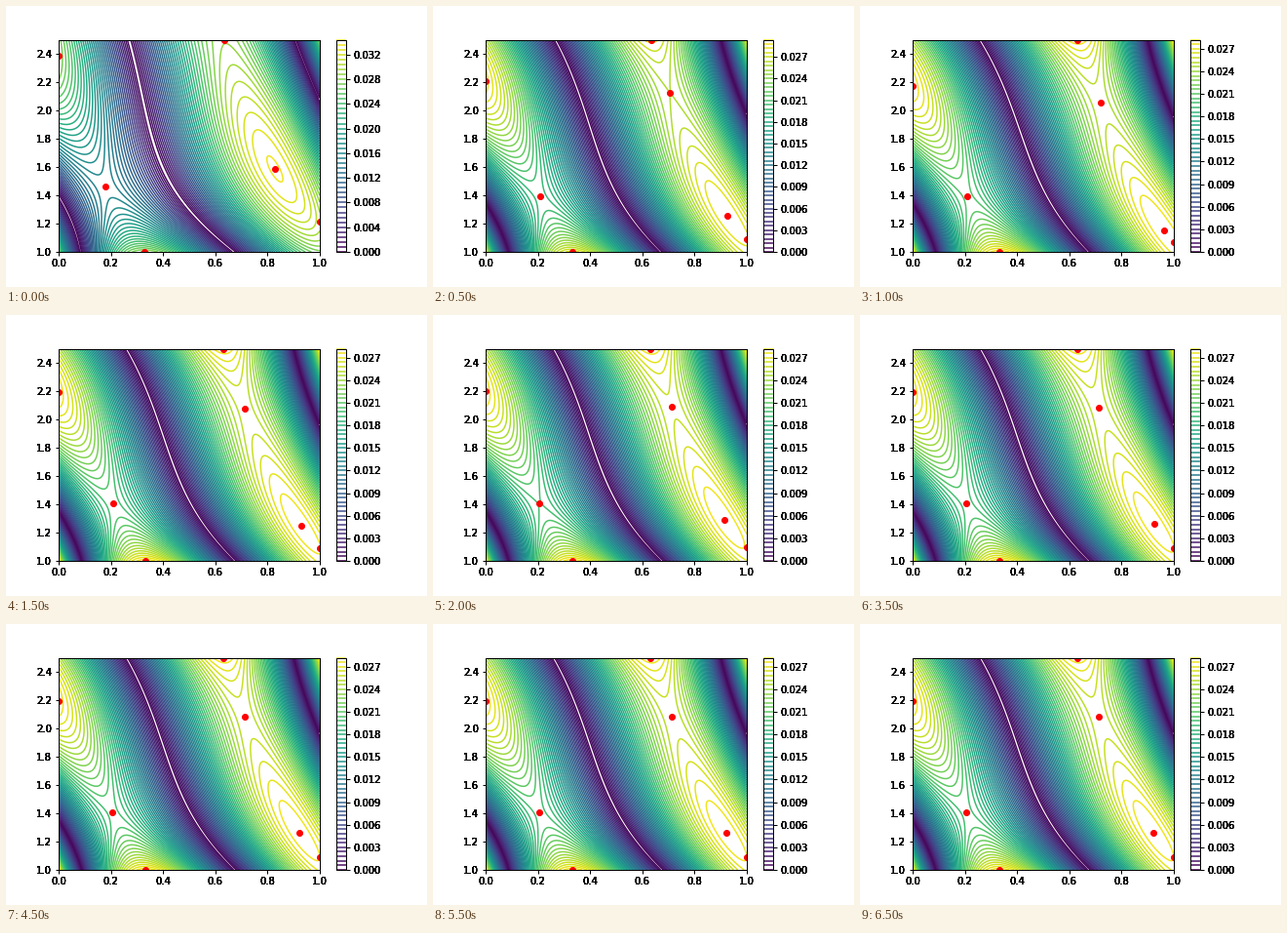
A matplotlib script for the animation above (7000 ms loop, 432 by 288 pixels).

```python
import numpy as np
import matplotlib.pyplot as plt
from matplotlib.animation import FuncAnimation
from matplotlib.text import Text

# Chebyshev approximation of log(x + y) sin(x) by quadratics on [0,1] x [1,2.5]:
# each step adds the critical points of the error and solves again.
FRAMES, INTERVAL = 14, 500
START = np.array([-0.1334, 0.0641, 0.1352, 0.205, 0.3137, -0.0283])
CORNERS = np.array([[0, 1], [1, 2.5], [0, 2.5], [1, 1]], float)

plt.rcParams.update({
    "font.family": "DejaVu Sans", "font.size": 10,
    "figure.subplot.left": 0.125, "figure.subplot.right": 0.9,
    "figure.subplot.bottom": 0.125, "figure.subplot.top": 0.88,
    "axes.linewidth": 1, "xtick.major.width": 1, "ytick.major.width": 1,
})


def func(x, y):
    return np.log(x + y) * np.sin(x)


def basis(x, y):
    return np.stack([np.ones_like(x), x, y, x * x, x * y, y * y], axis=-1)


def gradient(c, x, y):
    s = x + y
    gx = c[1] + 2 * c[3] * x + c[4] * y - np.sin(x) / s - np.cos(x) * np.log(s)
    gy = c[2] + c[4] * x + 2 * c[5] * y - np.sin(x) / s
    return gx, gy


def hessian(c, x, y):
    s = x + y
    curve = np.sin(x) / s**2
    hxx = 2 * c[3] - 2 * np.cos(x) / s + curve + func(x, y)
    hxy = c[4] - np.cos(x) / s + curve
    return hxx, hxy, 2 * c[5] + curve


def roots(t, g):
    i = np.nonzero(g[:-1] * g[1:] < 0)[0]
    return t[i] - g[i] * (t[i + 1] - t[i]) / (g[i + 1] - g[i])


def edge_points(c):
    points = []
    t = np.linspace(1, 2.5, 4001)
    for x in (0.0, 1.0):
        points += [(x, r) for r in roots(t, gradient(c, x, t)[1])]
    t = np.linspace(0, 1, 4001)
    for y in (1.0, 2.5):
        points += [(r, y) for r in roots(t, gradient(c, t, y)[0])]
    return np.array(points).reshape(-1, 2)


def inner_points(c):
    x, y = np.meshgrid(np.linspace(0.04, 0.96, 14), np.linspace(1.05, 2.45, 14))
    for _ in range(60):
        gx, gy = gradient(c, x, y)
        hxx, hxy, hyy = hessian(c, x, y)
        det = hxx * hyy - hxy**2
        x = np.clip(x - (hyy * gx - hxy * gy) / det, -0.2, 1.2)
        y = np.clip(y - (hxx * gy - hxy * gx) / det, 0.8, 2.7)
    gx, gy = gradient(c, x, y)
    ok = (np.hypot(gx, gy) < 1e-9) & (x > 0) & (x < 1) & (y > 1) & (y < 2.5)
    return np.unique(np.round(np.column_stack([x[ok], y[ok]]), 6), axis=0)


def critical_points(c):
    return np.vstack([edge_points(c), inner_points(c)])


def minimax(points, ref):
    """Best quadratic on a finite set, by single exchange from ref."""
    a = basis(points[:, 0], points[:, 1])
    f = func(points[:, 0], points[:, 1])
    ref = list(ref)
    for _ in range(200):
        lam = np.linalg.svd(a[ref].T)[2][-1]
        lam = lam if lam @ f[ref] > 0 else -lam
        sign = np.where(lam < 0, -1.0, 1.0)
        sol = np.linalg.solve(np.column_stack([a[ref], sign]), f[ref])
        c, level = sol[:6], sol[6]
        res = f - a @ c
        j = int(np.argmax(np.abs(res)))
        if abs(res[j]) <= abs(level) + 1e-10 or j in ref:
            break
        v = np.linalg.lstsq(a[ref].T, a[j], rcond=None)[0]
        ratio = np.sign(res[j]) * sign * v / (np.abs(lam) + 1e-15)
        ref[int(np.argmax(ratio))] = j
    return c, ref


def iterate():
    c, points, ref = START, CORNERS, [0, 1, 4, 5, 6, 7, 9]
    steps = []
    for _ in range(FRAMES):
        dots = critical_points(c)
        steps.append((c, dots))
        points = np.vstack([points, dots])
        c, ref = minimax(points, ref)
    return steps


def levels(k):
    if k == 0:
        return 0.0008 * np.arange(44)
    return 0.0006 * np.arange(50 if k == 1 else 48)


def ink(axis):
    # Repeated drawing gives the labels solid, heavy edges.
    for label in axis.get_ticklabels():
        label.draw = lambda r, t=label: [Text.draw(t, r) for _ in range(8)]


STEPS = iterate()
X, Y = np.meshgrid(np.linspace(0, 1, 250), np.linspace(1, 2.5, 250))
F, B = func(X, Y), basis(X, Y)

fig = plt.figure(figsize=(6, 4), dpi=72, facecolor="white")


def draw(k):
    c, dots = STEPS[k]
    fig.clear()
    ax = fig.add_subplot()
    lines = ax.contour(X, Y, np.abs(F - B @ c), levels=levels(k),
                       cmap="viridis", linewidths=1.5)
    ax.plot(dots[:, 0], dots[:, 1], "o", color="red", markersize=6)
    ax.set(xlim=(0, 1), ylim=(1, 2.5))
    bar = fig.colorbar(lines)
    for axis in (ax.xaxis, ax.yaxis, bar.ax.yaxis):
        ink(axis)
    return []


anim = FuncAnimation(fig, draw, frames=FRAMES, interval=INTERVAL,
                     init_func=lambda: [], repeat=True, repeat_delay=0)
plt.show()
```
